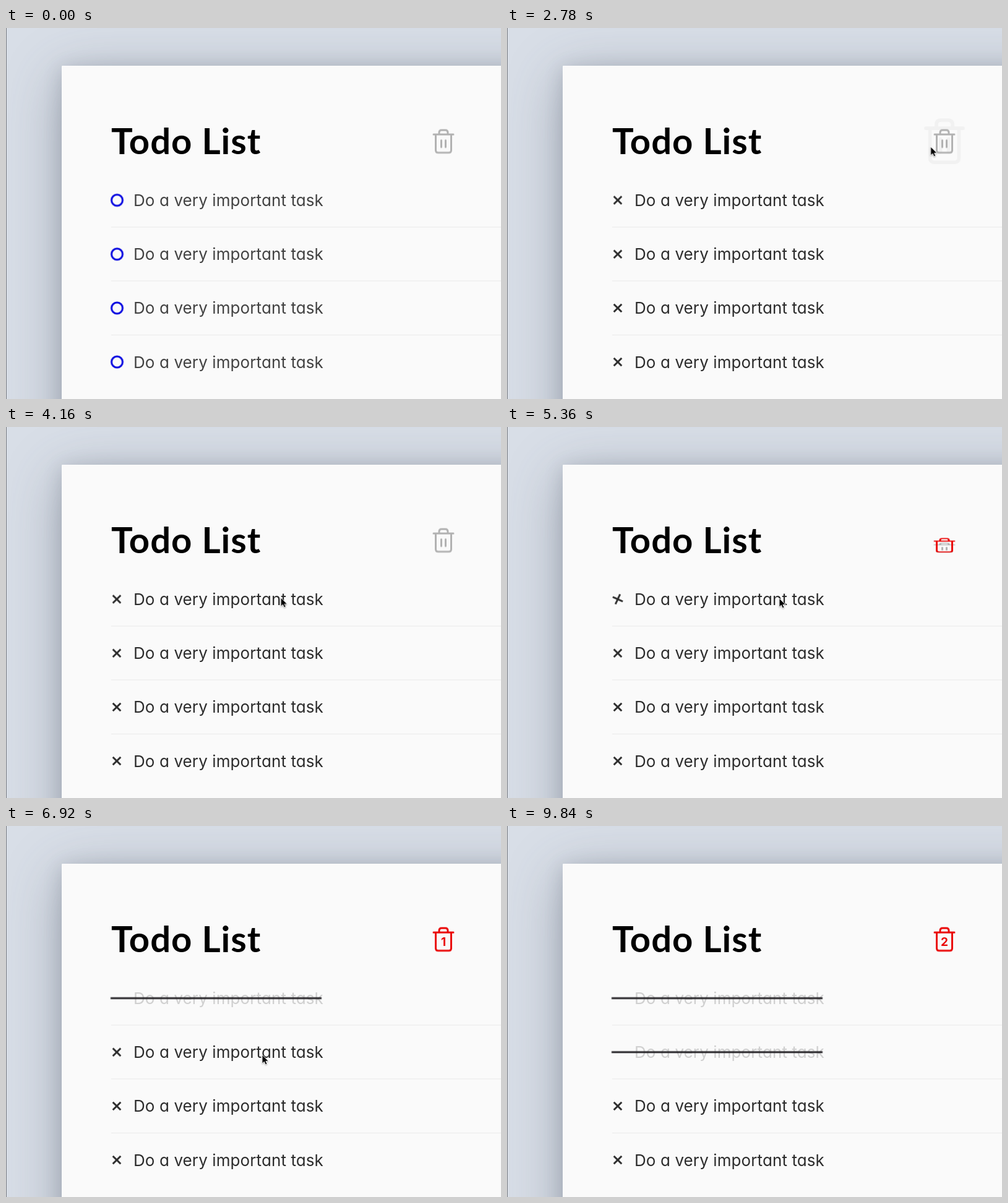
Recreate the animation shown at these times as an HTML page. Size 800 by 600 pixels, loop 9.86 s.

```html
<!DOCTYPE html>
<html lang="en">
<head>
<meta charset="utf-8">
<title>Todo List</title>
<style>
  html, body { margin: 0; width: 100%; height: 100%; overflow: hidden; }
  main { position: relative; width: 100%; height: 100%; overflow: hidden; contain: strict; background: #d8dee7; }
  #card {
    position: absolute; left: 90px; top: 61px; right: -100px; bottom: -100px;
    background: #fafafa; border-radius: 1px;
    box-shadow: 0 20px 90px rgba(70, 78, 96, .38), 0 4px 30px rgba(60, 68, 86, .2);
  }
  #edge { position: absolute; left: 0; top: 0; width: 1px; height: 100%; background: #777a80; }
  svg { position: absolute; left: 0; top: 0; display: block; color: #2c2c2c; }
  .title { font: 700 58px Lato, sans-serif; letter-spacing: 1px; }
  .task {
    font: 400 26px Inter, sans-serif; letter-spacing: .1px;
    font-feature-settings: "cv11"; fill: currentColor;
  }
  .ring { fill: none; stroke: #0606e0; stroke-width: 3; }
  .cross line { stroke: currentColor; stroke-width: 3; }
  .strike { fill: #242226; transform-origin: -10.5px 0; }
  .bin { fill: none; stroke-width: 3; stroke-linecap: round; stroke-linejoin: round; transform-origin: 707px 202.5px; }
  .gray { stroke: #b2b2b2; }
  .red { stroke: #ea0606; }
  #echo { transform-origin: 707px 183px; }
  .count { font: 700 19px Inter, sans-serif; fill: #ea0606; text-anchor: middle; transform-origin: 707px 193.5px; }
  #cursor { filter: drop-shadow(0 1px 1px rgba(0, 0, 0, .3)); }
</style>
</head>
<body>
<main>
<div id="card"></div>
<div id="edge"></div>
<svg id="stage" width="800" height="600" viewBox="0 0 800 600">
  <defs>
    <g id="can">
      <path d="M691 171.500H723M700 171V168.500Q700 164.500 704 164.500H710Q714 164.500 714 168.500V171"/>
      <path d="M694.500 172V197Q694.500 201 698.500 201H715.500Q719.500 201 719.500 197V172"/>
    </g>
    <path id="bars" d="M703.500 181V192M710.500 181V192"/>
  </defs>
  <text class="title" x="170" y="204">Todo List</text>
  <path d="M170 322H800M170 409H800M170 496.500H800" stroke="#e9e9e9"/>
  <g id="rows"></g>
  <g transform="translate(0 .6)">
    <g id="echo" class="bin gray"><use href="#can"/><use href="#bars"/></g>
    <g id="grayBin" class="bin gray"><use href="#can"/><use href="#bars"/></g>
    <g id="redBin" class="bin red"><use href="#can"/></g>
    <text id="one" class="count" x="707" y="193.500">1</text>
    <text id="two" class="count" x="707" y="193.500">2</text>
  </g>
  <g id="cursor">
    <path d="M0 0V14.200L3.300 11.200L5.500 16L8 14.900L5.900 10.300H10.200Z" fill="#000" stroke="#fff" stroke-width=".9"/>
  </g>
</svg>
</main>
<script>
const LOOP = 9860;
const CLEAR = 2380;           // bin clicked, rings turn into crosses
const DONE = [5270, 7720];    // tasks struck off
const byId = id => document.getElementById(id);

// Steps are [ms, styles]; the first and last are held to the ends of the loop.
function play(el, easing, ...steps) {
  const all = [[0, steps[0][1]], ...steps, [LOOP, steps.at(-1)[1]]];
  const frames = all.map(([ms, style]) => ({ ...style, offset: ms / LOOP, easing }));
  el.animate(frames, { duration: LOOP, iterations: Infinity });
}

const fade = opacity => ({ opacity });
const turn = transform => ({ transform });
const EASE_OUT = 'cubic-bezier(.25,.5,.5,1)';

function grow(el, start, length) {
  play(el, EASE_OUT, [start, turn('scaleY(0)')], [start + length, turn('scaleY(1)')]);
}

function addRow(index) {
  const row = document.createElementNS('http://www.w3.org/2000/svg', 'g');
  row.setAttribute('transform', `translate(179.5 ${278.5 + index * 87.2})`);
  row.innerHTML = `
    <circle class="ring" r="9"/>
    <g transform="translate(-.5 0)"><g class="cross">
      <line x1="-6.300" y1="-6.300" x2="6.300" y2="6.300"/>
      <line class="second" x1="-6.300" y1="6.300" x2="6.300" y2="-6.300"/>
    </g></g>
    <text class="task" x="26.500" y="9.500">Do a very important task</text>
    <rect class="strike" x="-10.500" y="-1.500" width="341" height="3"/>`;
  byId('rows').append(row);
  const [ring, cross, second, task, strike] =
    ['.ring', '.cross', '.second', '.task', '.strike'].map(s => row.querySelector(s));

  play(ring, EASE_OUT, [CLEAR, turn('scale(1)')], [CLEAR + 250, turn('scale(0)')]);
  const shown = [[CLEAR + 100, turn('scale(0) rotate(0deg)')], [CLEAR + 350, turn('scale(1) rotate(0deg)')]];
  const at = DONE[index];
  if (!at) {
    play(cross, 'linear', ...shown);
    strike.remove();
    return;
  }
  play(cross, 'linear', ...shown,
    [at, turn('scale(1) rotate(0deg)')], [at + 200, turn('scale(1) rotate(-45deg)')]);
  play(cross, 'linear', [at + 300, fade(1)], [at + 360, fade(0)]);
  play(second, 'linear', [at + 150, fade(1)], [at + 340, fade(0)]);
  play(strike, 'step-end', [at + 120, fade(0)], [at + 121, fade(1)]);
  play(strike, EASE_OUT, [at + 120, turn('scaleX(.05)')], [at + 460, turn('scaleX(1)')]);
  play(task, 'linear', [at + 210, fade(1)], [at + 460, fade(.2)]);
}

for (let i = 0; i < 4; i++) addRow(i);

// The ink is a little lighter at the start and after the first strike.
const ink = color => ({ color });
play(byId('stage'), 'linear',
  [20, ink('#424242')], [320, ink('#2c2c2c')], [5600, ink('#2c2c2c')],
  [5800, ink('#424242')], [6120, ink('#424242')], [6260, ink('#2c2c2c')]);

play(byId('echo'), EASE_OUT, [CLEAR, turn('scale(1)')], [CLEAR + 500, turn('scale(1.9)')]);
play(byId('echo'), 'linear', [CLEAR - 1, fade(0)], [CLEAR, fade(.6)], [CLEAR + 500, fade(0)]);

const [first, next] = DONE;
play(byId('grayBin'), EASE_OUT, [first, turn('scaleY(1)')], [first + 270, turn('scaleY(0)')]);
grow(byId('redBin'), first, 270);
play(byId('one'), EASE_OUT,
  [first + 200, turn('scaleY(0)')], [first + 380, turn('scaleY(1)')],
  [next, turn('scaleY(1)')], [next + 250, turn('scaleY(0)')]);
grow(byId('two'), next, 250);

const path = [
  [1160, 800, 300], [1800, 688, 189], [2080, 688, 189], [2180, 693, 187],
  [2640, 693, 187], [3340, 592, 246], [3500, 592, 246], [4260, 439, 277],
  [5060, 440, 277], [5360, 440, 277], [6100, 413, 352], [6300, 408, 364],
  [6560, 404, 378], [6720, 404, 378], [6920, 414, 370], [7380, 414, 370],
  [7600, 415, 367], [8320, 415, 367], [9300, 769, 427]
];
play(byId('cursor'), 'ease-in-out',
  ...path.map(([ms, x, y]) => [ms, turn(`translate(${x}px, ${y}px)`)]));
play(byId('cursor'), 'linear',
  [1159, fade(0)], [1160, fade(1)], [9320, fade(1)], [9820, fade(0)]);
</script>
</body>
</html>
```
